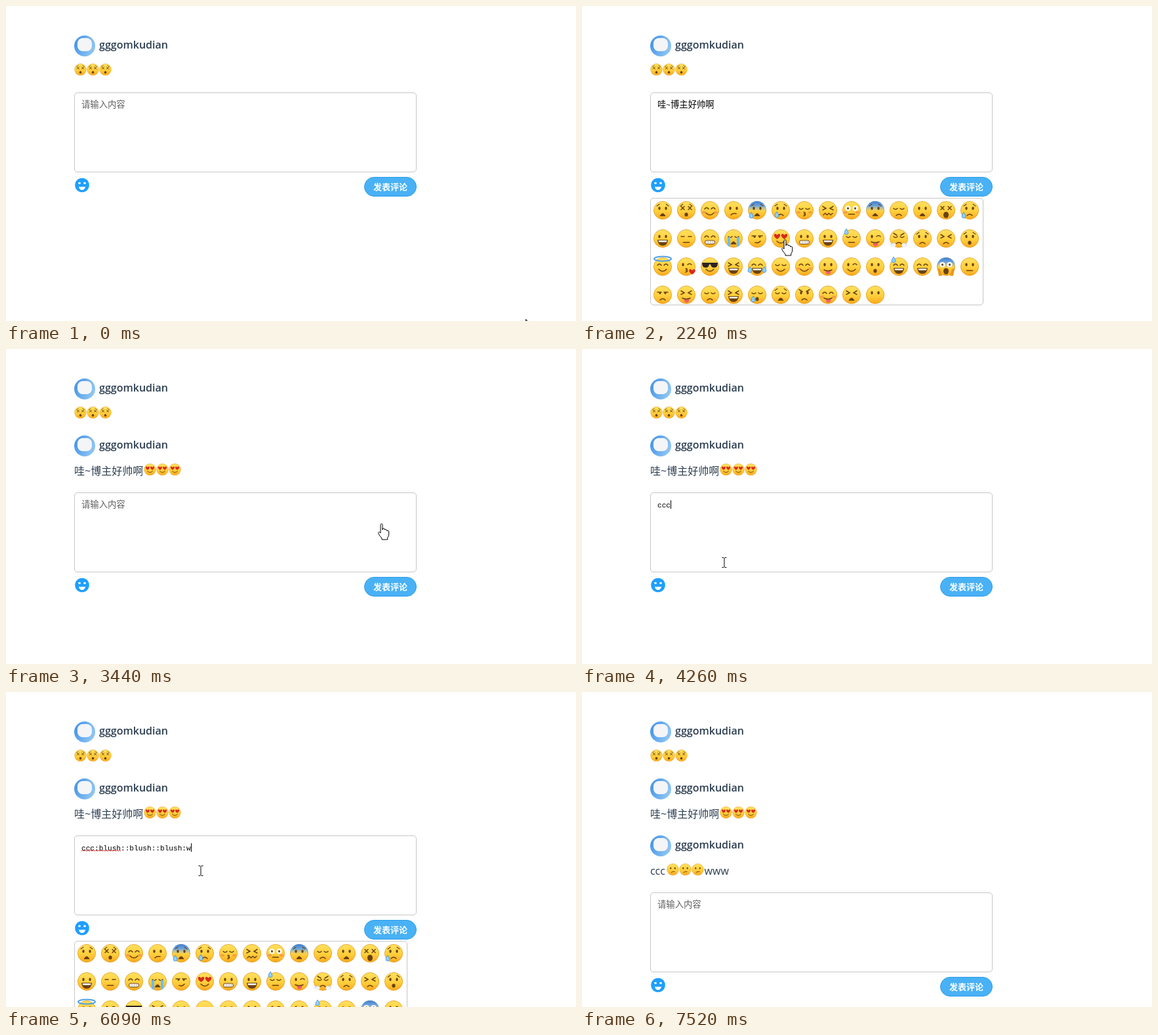
Recreate the animation shown at these times as an HTML page. Size 869x481 px, loop 8.13 s.

```html
<!DOCTYPE html>
<html lang="zh">
<head>
<meta charset="utf-8">
<style>
  html, body { margin: 0; width: 100%; height: 100%; overflow: hidden; background: #fff; }
  svg { display: block; }
  text { white-space: pre; font-family: "Open Sans", "Noto Sans CJK SC", sans-serif; fill: #2c3e50; font-size: 16px; }
  .name { font-weight: 600; }
  .input { font-family: "Liberation Mono", "Noto Sans CJK SC", monospace; font-size: 13.33px; fill: #000; }
  .hint { font-family: "Noto Sans CJK SC", sans-serif; font-size: 13.33px; font-weight: 300; fill: #606060; }
  .send { font-family: "Noto Sans CJK SC", sans-serif; font-size: 13px; font-weight: 700; fill: #fff; }
  .box { fill: #fff; stroke: #c6c6c6; }
  .pointer { fill: #fff; stroke: #000; stroke-linejoin: round; }
</style>
</head>
<body>
<svg width="869" height="481" viewBox="0 0 869 481">
  <defs>
    <linearGradient id="skin" x2="0" y2="1">
      <stop stop-color="#ffe15f"/><stop offset=".55" stop-color="#ffcf3d"/><stop offset="1" stop-color="#fba91c"/>
    </linearGradient>
    <linearGradient id="cold" x2="0" y2="1">
      <stop stop-color="#3f7fd0"/><stop offset=".25" stop-color="#6ba2dc"/><stop offset=".55" stop-color="#9cc4e0" stop-opacity="0"/>
    </linearGradient>
    <linearGradient id="sky" x2="1" y2=".4">
      <stop stop-color="#3d8ee6"/><stop offset="1" stop-color="#8cc4f2"/>
    </linearGradient>
  </defs>
  <g id="comments"></g>
  <g id="editor">
    <rect class="box" x="104.5" y="132.5" width="521" height="121" rx="4.5"/>
    <text class="hint" id="hint" x="115" y="155">请输入内容</text>
    <text class="input" id="input" x="115" y="155"></text>
    <path id="squiggle" fill="none" stroke="#e02020" stroke-width=".9"/>
    <path id="caret" d="M0 144v13" stroke="#000"/>
    <g id="icon">
      <circle cx="116" cy="273.5" r="10.8"/>
      <path d="M111 276h10q-1 5-5 5t-5-5z" fill="#fff"/>
      <circle cx="112" cy="270.5" r="1.8" fill="#fff"/><circle cx="120" cy="270.5" r="1.8" fill="#fff"/>
    </g>
    <rect x="546.5" y="261.5" width="79" height="29" rx="14.5" fill="#49b1f5" stroke="#2c9ee8"/>
    <text class="send" x="586" y="281" text-anchor="middle">发表评论</text>
    <g id="panel"><rect class="box" x="104.5" y="293.5" width="507" height="163" rx="4.5"/></g>
  </g>
  <g id="cursor"></g>
</svg>
<script>
const $ = id => document.getElementById(id);
const LOOP = 8130, ROW = 87, BROWN = '#6a4212';

// ---- emoji parts, drawn around (0,0) in a face of radius 14 ----
const line = (d, c = BROWN, w = 1.5) =>
  `<path d="${d}" fill="none" stroke="${c}" stroke-width="${w}" stroke-linecap="round"/>`;
const fill = (d, c = BROWN) => `<path d="${d}" fill="${c}"/>`;
const dot = (x, y, rx, ry, c = BROWN) => `<ellipse cx="${x}" cy="${y}" rx="${rx}" ry="${ry}" fill="${c}"/>`;
const pair = (x, y, rx, ry, c) => dot(-x, y, rx, ry, c) + dot(x, y, rx, ry, c);
const heart = (x, y, c = '#d8281c') => fill(`M${x} ${y + 4}c-9-6-3-11 0-6c3-5 9 0 0 6z`, c);
const drop = (x, y) =>
  `<path d="M${x} ${y}q6 8 0 9q-6-1 0-9z" fill="#8fd0fa" stroke="#3f8fd8" stroke-width=".8"/>`;
const tongue = fill('M-3 6h7v4q-3.500 4-7 0z', '#f0606c');

const eyes = {
  o: pair(5, -3, 1.7, 2.4),
  n: line('M-8-2q3-4 6 0M2-2q3-4 6 0'),
  u: line('M-8-3q3 3 6 0M2-3q3 3 6 0'),
  x: line('M-8-6l5 5m0-5l-5 5M3-6l5 5m0-5l-5 5'),
  g: line('M-8-6l5 3-5 2.500M8-6l-5 3 5 2.500'),
  '-': line('M-8-3h5M3-3h5'),
  w: dot(-5, -3, 1.7, 2.4) + line('M2-3q3-3 6 0'),
  O: pair(5.5, -3, 4, 4, '#fff') + pair(5.5, -3, 1.6, 1.8),
  h: heart(-5.5, -3) + heart(5.5, -3),
  s: fill('M-12-6h24q0 8-6 7.500-4 0-5-5h-2q-1 5-5 5-6 .5-6-7.500z', '#2b2422'),
  d: line('M-8-4h6M2-4h6') + pair(4, -2.5, 1.5, 1.6)
};
const mouths = {
  ')': line('M-6 4q6 6 12 0'),
  '(': line('M-4 8q4-4 8 0'),
  D: fill('M-8 2h16q-1 9-8 9t-8-9z') + fill('M-6.500 3h13l-.7 2.500h-11.600z', '#fff'),
  T: `<rect x="-7.500" y="3" width="15" height="5.500" rx="2.500" fill="#fff" stroke="${BROWN}"/>` + line('M-7 5.800H7M-3 3v5M1 3v5M4.500 3v5', '#b9a58c', .6),
  o: dot(0, 6.5, 2.6, 3),
  O: dot(0, 7, 4, 4.8),
  A: fill('M-4.500 9q4.500-9 9 0z'),
  '/': line('M-4 7q3-3 8-2'),
  '-': line('M-4.500 6h9'),
  k: line('M-1 3q4 0 1 2.500q4 .5-1 3'),
  z: line('M-7 7l2.800-2.500 2.800 2.500 2.800-2.500 2.800 2.500 2.800-2.500'),
  p: tongue + line('M-6 5q6 3 12 0'),
  '~': line('M-3 6q5 2 8-2'),
  _: ''
};
const extras = {
  b: line('M-9-6.500l4-3M9-6.500l-4-3', BROWN, 1.1),
  v: line('M-8-8l5 3M8-8l-5 3'),
  B: '<circle r="14" fill="url(#cold)"/>',
  c: pair(9, 3, 3, 2, '#f5824a99'),
  t: drop(-6, 2),
  f: drop(-9, 3),
  w: drop(-8, -15),
  s: fill('M-9-2h4v14q-2 1-4-1zM5-2h4v13q-2 2-4 1z', '#6bbdf2'),
  J: drop(-11, 0) + drop(11, 0),
  H: '<ellipse cy="-12" rx="13" ry="3.500" fill="none" stroke="#4f9fe4" stroke-width="2"/>',
  L: heart(9, 8),
  S: pair(9, 10, 4.5, 3, '#eef3f8') + line('M-12 9l5-3M12 9l-5-3', '#b9c7d6', 1),
  R: fill('M-13 3q4-1 5 4l2 7h-5zM13 3q-4-1-5 4l-2 7h5z', '#e89a1a')
};
const faces = ('oAb xob n)c o/ oABbf o(bt ukc gz O-c oABb u( oA xO o(bf ' +
  'oD -- nT uAs d~ h) oT oD u-w wp u(vS o(b g( oob ' +
  'n)H wkL s) gD nDJ u) n)c op w) oo nDw nD OOBR o- ' +
  'd( gp u( gD uot uAb o(v npc gA o_').split(' ');

function emoji(index, x, y, size = 1) {
  const [eye, mouth, ...more] = faces[index];
  const under = more.includes('B') ? extras.B : '';
  const over = more.filter(k => k !== 'B').map(k => extras[k]).join('');
  return `<g transform="translate(${x} ${y}) scale(${size})">
    <circle r="13.600" fill="url(#skin)" stroke="#e09a1e" stroke-width=".8"/>
    ${under}${eyes[eye]}${mouths[mouth]}${over}</g>`;
}

$('panel').innerHTML += faces.map((_, i) =>
  emoji(i, 123 + i % 14 * 36, 312 + Math.floor(i / 14) * 43)).join('');

// ---- comments ----
const comment = (row, face, x, before = '', after = '') => `<g transform="translate(0 ${row * ROW})">
  <circle cx="120" cy="61" r="16" fill="url(#sky)"/>
  <rect x="109" y="49" width="22" height="20" rx="8" fill="#f4f5f7"/>
  <text class="name" x="142" y="65">gggomkudian</text>
  <text x="104" y="105">${before}</text>
  ${[0, 1, 2].map(i => emoji(face, x + i * 19, 97, .65)).join('')}
  <text x="${x + 48}" y="105">${after}</text></g>`;
$('comments').innerHTML = comment(0, 1, 113.5) + comment(1, 19, 219.5, '哇~博主好帅啊') +
  comment(2, 3, 138.5, 'ccc', 'www');
const rows = [...$('comments').children];

// ---- pointer ----
const shapes = {
  arrow: '<path class="pointer" d="M.5.5v16l3.700-3.500 2.600 6 2.500-1-2.600-6h5z"/>',
  hand: '<path class="pointer" d="M-2 14V1.500q0-1.500 1.500-1.500T1 1.500V9V7.500q1.700-1.300 3.200.3V9q1.700-1.300 3.200.3v1.200q1.700-1 3.300.6V16q0 3-2 5v3H0v-2q-3-3-5-7-1-2 .5-2.500T-2 14Z"/>',
  beam: '<path d="M-3.500-7.500h2.500l1 1 1-1h2.500M0-6.500v13M-3.500 7.500h2.500l1-1 1 1h2.500" fill="none" stroke="#000"/>'
};
const moves = [
  [0, 792, 478, 'arrow'], [60, 792, 478, 'arrow'], [290, 610, 250, 'beam'], [490, 362, 190, 'beam'],
  [1230, 362, 190, 'beam'], [1400, 200, 258, 'arrow'], [1500, 118, 283, 'hand'], [1780, 118, 283, 'hand'],
  [2180, 310, 357, 'hand'], [2840, 310, 357, 'hand'], [3180, 573, 267, 'hand'], [3450, 573, 267, 'hand'],
  [3500, 520, 273, 'beam'], [3640, 325, 290, 'beam'], [4130, 325, 290, 'beam'], [4330, 160, 345, 'arrow'],
  [4440, 119, 361, 'hand'], [4680, 119, 361, 'hand'], [4920, 231, 396, 'hand'], [5500, 231, 396, 'hand'],
  [5600, 255, 340, 'beam'], [5760, 297, 273, 'beam'], [6200, 297, 273, 'beam'], [6300, 438, 316, 'beam'],
  [6460, 571, 357, 'hand'], [7150, 571, 357, 'hand'], [7210, 592, 370, 'beam'], [7370, 680, 430, 'arrow'],
  [7520, 775, 490, 'arrow'], [LOOP, 775, 490, 'arrow']
];
let shape;
function movePointer(t) {
  const i = moves.findIndex(m => m[0] > t) - 1;
  const [t0, x0, y0, kind] = moves[i], [t1, x1, y1] = moves[i + 1];
  const k = (t - t0) / (t1 - t0);
  $('cursor').setAttribute('transform', `translate(${x0 + (x1 - x0) * k} ${y0 + (y1 - y0) * k})`);
  if (kind !== shape) $('cursor').innerHTML = shapes[shape = kind];
}

// ---- input text: [start, step between pieces, pieces] ----
const POST1 = 3330, POST2 = 6700;
const typing = [
  [740, 80, [...'哇~博主好帅啊']], [2310, 90, Array(3).fill(':heart_eyes:')],
  [3750, 80, [...'ccc']], [4950, 70, Array(3).fill(':blush:')], [6090, 60, [...'www']]
];
function typed(t) {
  const from = t < POST1 ? 0 : t < POST2 ? POST1 : POST2;
  return typing.filter(p => p[0] >= from && p[0] <= t)
    .map(([start, step, parts]) => parts.slice(0, 1 + Math.floor((t - start) / step)).join('')).join('');
}
const within = (t, ...spans) => spans.some(([a, b]) => t >= a && t < b);
const show = (el, on) => { el.style.display = on ? '' : 'none'; };
$('squiggle').setAttribute('d', 'M115 156' + 'l2-1.500 2 1.500'.repeat(15));

let lastText;
function frame(now) {
  const t = now % LOOP;
  const posted = (t >= POST1) + (t >= POST2);
  rows.forEach((r, i) => show(r, i <= posted));
  $('editor').setAttribute('transform', `translate(0 ${posted * ROW})`);

  const text = typed(t);
  if (text !== lastText) {
    $('input').innerHTML = text.replace(/[ -~]+/g, s => `<tspan font-size="11.110">${s}</tspan>`);
    lastText = text;
  }
  show($('hint'), !text);
  const cells = [...text].reduce((n, c) => n + (c > '~' ? 2 : 1), 0);
  $('caret').setAttribute('transform', `translate(${Math.round(115 + cells * 6.667) + .5} 0)`);
  show($('caret'), within(t, [490, 1500], [3640, 4400], [5760, 6400]));
  show($('squiggle'), within(t, [5760, POST2]));
  show($('panel'), within(t, [1710, POST1], [4580, POST2]));
  $('icon').setAttribute('fill', within(t, [1500, 1830], [4440, 4720]) ? '#49b1f5' : '#1e9fff');
  movePointer(t);
  requestAnimationFrame(frame);
}
requestAnimationFrame(frame);
</script>
</body>
</html>
```
